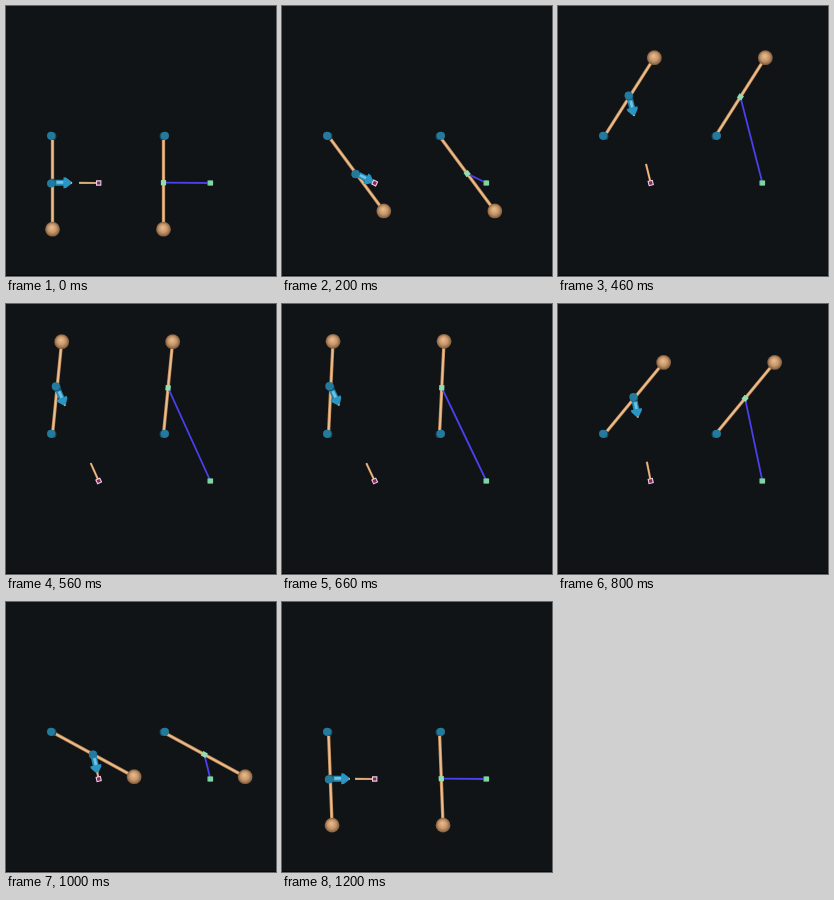
An HTML page with a canvas for the animation above (1.23 s loop, 270x270 px).

```html
<!DOCTYPE html>
<html lang="en">
<head>
<meta charset="utf-8">
<title>Driven pendulums</title>
<style>
  html, body { margin: 0; width: 100%; height: 100%; overflow: hidden; background: #101416; }
  canvas { display: block; width: 100vw; height: 100vh; }
</style>
</head>
<body>
<canvas id="stage"></canvas>
<script>
const SIZE = 270, LOOP = 1230, ROD = 93, SLIDER = 19.6;
const TAU = Math.PI * 2;
const canvas = document.getElementById('stage');
const dpr = window.devicePixelRatio || 1;
canvas.width = canvas.height = Math.round(SIZE * dpr);
const ctx = canvas.getContext('2d');
ctx.scale(canvas.width / SIZE, canvas.width / SIZE);

// Swing: step, angle from straight down (degrees), speed (degrees per step)
const SWING = [
  [0, 0, 0], [6, 36.5, 14.5], [14, 147.6, 10.5], [16, 167, 8.2],
  [18.6, 179.8, 0], [20, 177.2, -4.2], [24, 140.5, -12],
  [30, 61.4, -16], [32, 30, -13.8], [36, 2.2, -2.4], [38, 0, 0]
];

// Steps last 30, 30 and 40 ms in turn
function stepAt(ms) {
  return 3 * Math.floor(ms / 100) + Math.min(2, Math.floor((ms % 100) / 30));
}

function swingAngle(step) {
  let i = 0;
  while (i < SWING.length - 2 && step >= SWING[i + 1][0]) i++;
  const [x0, a0, v0] = SWING[i], [x1, a1, v1] = SWING[i + 1];
  const h = x1 - x0, u = (step - x0) / h, w = 1 - u;
  const deg = a0 * (1 + 2 * u) * w * w + h * v0 * u * w * w
            + a1 * u * u * (3 - 2 * u) - h * v1 * u * u * w;
  return deg * Math.PI / 180;
}

// Joint caps sit nearer to the camera than the rods
function near(p) {
  return { x: 102 + (p.x - 102) * 1.025, y: 145 + (p.y - 145) * 1.025 };
}

function along(p, angle, d) {
  return { x: p.x + Math.cos(angle) * d, y: p.y + Math.sin(angle) * d };
}

function line(a, b, width, color) {
  ctx.beginPath();
  ctx.moveTo(a.x, a.y);
  ctx.lineTo(b.x, b.y);
  ctx.lineWidth = width;
  ctx.strokeStyle = color;
  ctx.stroke();
}

function bar(a, b, width) {
  line(a, b, width, '#b98556');
  line(a, b, width * 0.55, '#edbd8b');
}

function disc(p, r, color) {
  ctx.beginPath();
  ctx.arc(p.x, p.y, r, 0, TAU);
  ctx.fillStyle = color;
  ctx.fill();
}

function joint(p) {
  disc(p, 3.9, '#174d65');
  disc(near(p), 4.1, '#247a9c');
}

function ball(p) {
  const g = ctx.createRadialGradient(p.x - 0.8, p.y - 1.8, 0.5, p.x, p.y, 7.4);
  g.addColorStop(0, '#e6bb8c');
  g.addColorStop(0.55, '#c6966a');
  g.addColorStop(1, '#7d5a3c');
  disc(p, 7.4, g);
}

function at(p, angle, draw) {
  ctx.save();
  ctx.translate(p.x, p.y);
  ctx.rotate(angle);
  draw();
  ctx.restore();
}

function square(p, angle, size, color) {
  at(p, angle, () => {
    ctx.fillStyle = color;
    ctx.fillRect(-size / 2, -size / 2, size, size);
  });
}

function arrow(p, angle) {
  at(p, angle, () => {
    ctx.fillStyle = '#268bb5';
    ctx.fillRect(3, -3, 9, 6);
    ctx.fillStyle = '#6cc3e4';
    ctx.fillRect(4, -1.7, 7, 2.8);
    ctx.beginPath();
    ctx.moveTo(11, -5.6);
    ctx.lineTo(13.5, -5.2);
    ctx.lineTo(18.4, -1.5);
    ctx.lineTo(18.4, 1.5);
    ctx.lineTo(13.5, 5.2);
    ctx.lineTo(11, 5.6);
    ctx.closePath();
    ctx.fillStyle = '#2a95c3';
    ctx.fill();
  });
}

function pendulum(pivot, swing) {
  const dir = Math.PI / 2 - swing;
  const mid = along(pivot, dir, ROD / 2), end = along(pivot, dir, ROD);
  bar(pivot, end, 3.3);
  ball(end);
  joint(pivot);
  return { mid, dir };
}

function sliderRig(swing) {
  const goal = { x: 92.7, y: 177 };
  const { mid } = pendulum({ x: 46.5, y: 130.2 }, swing);
  const dir = Math.atan2(goal.y - mid.y, goal.x - mid.x);
  bar(goal, along(goal, dir, -SLIDER), 2.2);
  bar(mid, along(mid, dir, SLIDER), 2.2);
  joint(mid);
  arrow(mid, dir);
  square(goal, dir, 5.4, '#ead0e2');
  square(goal, dir, 3.2, '#8d1f5c');
}

function tendonRig(swing) {
  const goal = { x: 204.4, y: 177 };
  const { mid, dir } = pendulum({ x: 157.5, y: 130.2 }, swing);
  line(mid, goal, 1.8, '#4a40ec');
  square(mid, dir, 5.2, '#8fe0ae');
  square({ x: goal.x - 0.8, y: goal.y }, 0, 5, '#3f8a6c');
  square({ x: goal.x + 0.2, y: goal.y }, 0, 5, '#7fd6a2');
}

const start = performance.now();
function frame() {
  const swing = swingAngle(stepAt((performance.now() - start) % LOOP));
  ctx.fillStyle = '#101416';
  ctx.fillRect(0, 0, SIZE, SIZE);
  ctx.fillStyle = '#05070a';
  ctx.fillRect(0, SIZE - 1, SIZE, 1);
  sliderRig(swing);
  tendonRig(swing);
  requestAnimationFrame(frame);
}
frame();
</script>
</body>
</html>
```
